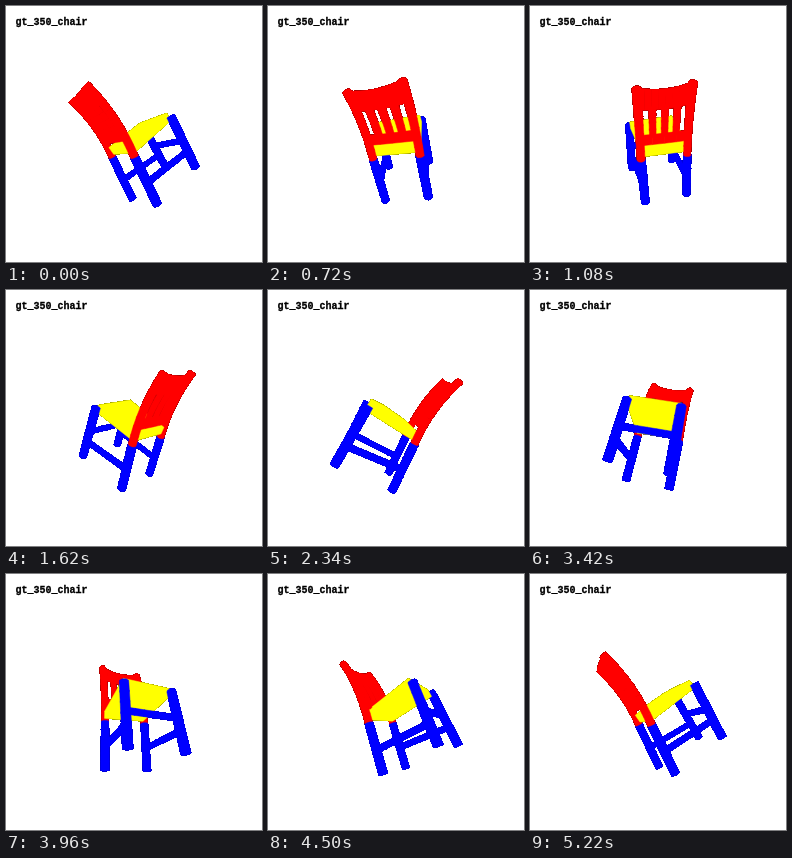
An HTML page with a canvas that plays this animation: 256 by 256 pixels, repeating every 5400 ms.

```html
<!DOCTYPE html>
<html lang="en">
<head>
<meta charset="utf-8">
<title>Turning chair</title>
<style>
  html, body { margin: 0; width: 100%; height: 100%; overflow: hidden; background: #fff; }
  canvas { position: absolute; left: 0; top: 0; width: 256px; height: 256px; }
  p {
    position: absolute; left: 9.5px; top: 10.5px; margin: 0;
    font: bold 10px/12px "Liberation Mono", "DejaVu Sans Mono", monospace;
    -webkit-text-stroke: 0.3px #000;
    color: #000; white-space: pre;
  }
</style>
</head>
<body>
<canvas id="stage" width="256" height="256"></canvas>
<p>gt_350_chair</p>
<script>
const ctx = document.getElementById("stage").getContext("2d", { willReadFrequently: true });
const RED = "#f00", BLUE = "#00f", YELLOW = "#ff0";
const EDGE = { [RED]: "#600", [BLUE]: "#00a", [YELLOW]: "#660" };
const STEP = 180, STEPS = 30, START = -66, EYE = 230, CENTER = 128;

// Points are [backward, sideways, up], relative to the turning axis.
const add = (a, b, k = 1) => a.map((v, i) => v + b[i] * k);
const mix = (a, b, t) => a.map((v, i) => v + (b[i] - v) * t);
const unit = a => a.map(v => v / Math.hypot(...a));
const cross = (a, b) => [
  a[1] * b[2] - a[2] * b[1],
  a[2] * b[0] - a[0] * b[2],
  a[0] * b[1] - a[1] * b[0]
];

// Each pair holds the left and the right side, seen from behind.
const frontTop = [[-24, -29, 10.5], [-31, 19, 17.5]];
const frontFoot = [[-54.5, -26.5, -42], [-57.5, 23.5, -34]];
const joint = [[17, -17.4, -24], [11.5, 27, -20]];
const rearFoot = [[-4, -12.4, -69], [-9, 31, -63]];
const backTop = [[58, -22, 33.5], [53, 22, 40.5]];
const seatFront = [[-23, -28, 9.3], [-29, 19, 17]];
const seatRear = [[18.5, -16, -17.5], [14, 27, -13]];

const parts = [];
const addPart = (color, points) => parts.push({ color, points });

function ring(p, dir, r) {
  const u = unit(cross(dir, [0.3, 0.9, 0.2]));
  const v = unit(cross(dir, u));
  return Array.from({ length: 8 }, (_, i) => {
    const a = (i + 0.5) * Math.PI / 4;
    return add(add(p, u, r * Math.cos(a)), v, r * Math.sin(a));
  });
}

// A round bar along a path, cut into pieces for depth sorting.
function bar(color, path, r, n = 6) {
  for (let i = 0; i < n; i++) {
    const a = path(i / n), b = path((i + 1) / n);
    const dir = unit(add(b, a, -1));
    addPart(color, [...ring(a, dir, r), ...ring(b, dir, r)]);
  }
}
const straight = (a, b) => t => mix(a, b, t);

const post = side => t =>
  add(mix(joint[side], backTop[side], t), [-3, 0, 2.5], 4 * t * (1 - t));

// Backrest surface: f runs across, t runs up.
const back = (f, t) =>
  add(mix(post(0)(t), post(1)(t), f), [2, 0, -3.5], 4 * f * (1 - f) * t * t);

function panel(f0, f1, t0, t1, nf, nt) {
  const normal = [1.1, 0, -0.9];
  for (let i = 0; i < nf; i++) {
    for (let j = 0; j < nt; j++) {
      const points = [];
      for (const di of [0, 1]) for (const dj of [0, 1]) for (const k of [-1, 1]) {
        const f = f0 + (f1 - f0) * (i + di) / nf;
        const t = t0 + (t1 - t0) * (j + dj) / nt;
        points.push(add(back(f, t), normal, k));
      }
      addPart(RED, points);
    }
  }
}

function seat() {
  const normal = unit([0.55, -0.12, 0.8]);
  const corners = [...seatFront, ...seatRear];
  const middle = mix(mix(...seatFront, 0.5), mix(...seatRear, 0.5), 0.5);
  const points = corners.flatMap(p => [add(p, normal, 4.3), add(p, normal, -4.3)]);
  for (const p of corners) points.push(add(mix(middle, p, 0.45), normal, 7));
  addPart(YELLOW, points);
}

for (const s of [0, 1]) {
  const front = straight(frontTop[s], frontFoot[s]);
  const rear = straight(joint[s], rearFoot[s]);
  bar(BLUE, front, 4.2);
  bar(BLUE, rear, 4.1);
  bar(BLUE, straight(front(0.67), rear(0.54)), 3);
  bar(RED, post(s), 3.7, 8);
}
bar(BLUE, straight(mix(frontTop[0], frontFoot[0], 0.47), mix(frontTop[1], frontFoot[1], 0.47)), 2.9);
seat();
panel(0, 1, 0.73, 1, 8, 1);
panel(0, 1, 0.22, 0.34, 4, 1);
for (const f of [0.26, 0.5, 0.74]) panel(f - 0.065, f + 0.065, 0.32, 0.75, 1, 4);

function project([b, s, h], sin, cos) {
  const z = b * cos - s * sin;
  const k = EYE / (EYE - z);
  return [CENTER + (b * sin + s * cos) * k, CENTER - h * k, z];
}

function hull(points) {
  const sorted = [...points].sort((a, b) => a[0] - b[0] || a[1] - b[1]);
  const half = list => {
    const out = [];
    for (const p of list) {
      while (out.length > 1) {
        const [a, b] = out.slice(-2);
        if ((b[0] - a[0]) * (p[1] - a[1]) - (b[1] - a[1]) * (p[0] - a[0]) > 0) break;
        out.pop();
      }
      out.push(p);
    }
    return out.slice(0, -1);
  };
  return [...half(sorted), ...half(sorted.reverse())];
}

function trace(outline) {
  ctx.beginPath();
  for (const [x, y] of outline) ctx.lineTo(x, y);
  ctx.closePath();
}

// Turns soft outer edges into hard pixel steps.
function harden() {
  const image = ctx.getImageData(0, 0, 256, 256);
  for (let i = 3; i < image.data.length; i += 4) {
    image.data[i] = image.data[i] > 127 ? 255 : 0;
  }
  ctx.putImageData(image, 0, 0);
}

function draw(step) {
  const angle = (START + step * 360 / STEPS) * Math.PI / 180;
  const sin = Math.sin(angle), cos = Math.cos(angle);
  const shapes = parts.map(({ color, points }) => {
    const flat = points.map(p => project(p, sin, cos));
    const depth = flat.reduce((sum, p) => sum + p[2], 0) / flat.length;
    return { color, depth, outline: hull(flat) };
  });
  shapes.sort((a, b) => a.depth - b.depth);

  ctx.clearRect(0, 0, 256, 256);
  ctx.lineJoin = "round";
  ctx.lineWidth = 0.9;
  for (const { color, outline } of shapes) {
    ctx.strokeStyle = EDGE[color];
    trace(outline);
    ctx.stroke();
  }
  ctx.lineWidth = 0.5;
  for (const { color, outline } of shapes) {
    ctx.fillStyle = ctx.strokeStyle = color;
    trace(outline);
    ctx.fill();
    ctx.stroke();
  }
  harden();
}

const begin = performance.now();
let shown = -1;
function tick() {
  const step = Math.floor((performance.now() - begin) / STEP) % STEPS;
  if (step !== shown) draw(shown = step);
  requestAnimationFrame(tick);
}
tick();
</script>
</body>
</html>
```
